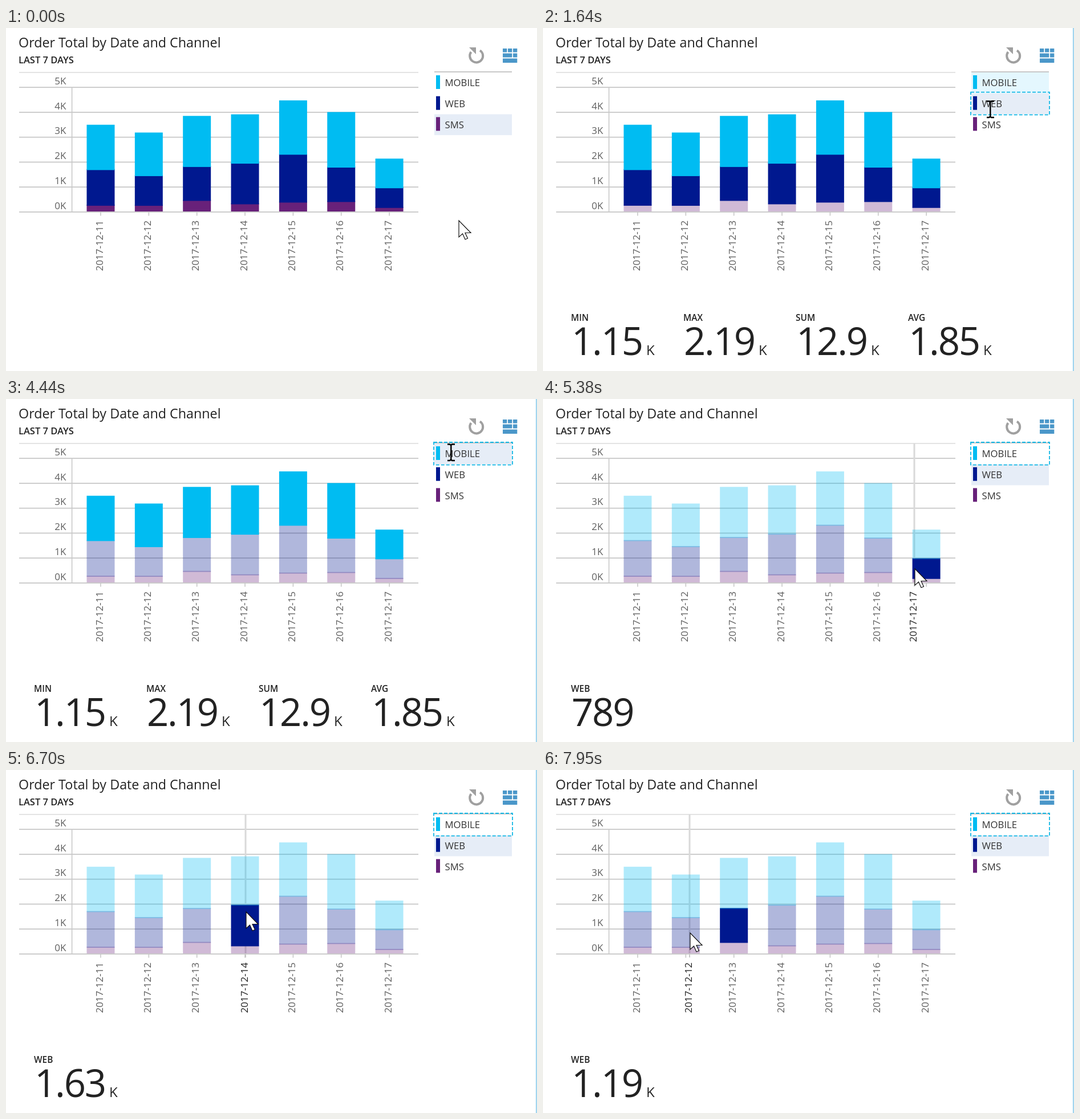
Write an HTML page that moves like this. It is 931 by 602 pixels and loops after 8 s.

```html
<!DOCTYPE html>
<html lang="en">
<head>
<meta charset="utf-8">
<title>Order Total by Date and Channel</title>
<style>
html, body { margin: 0; width: 100%; height: 100%; overflow: hidden; background: #fff; }
svg { display: block; width: 931px; height: 602px; font-family: "Open Sans", "Noto Sans", sans-serif; fill: #222; }
text { white-space: pre; }
.title { font-size: 23.3px; }
.sub { font-size: 16.5px; font-weight: 600; }
.axis { font-size: 17px; fill: #5e5e5e; }
.hot { fill: #222; }
.key { font-size: 16.7px; fill: #333; }
.name { font-size: 15.4px; font-weight: 600; }
.num { font-size: 67px; letter-spacing: -2.2px; }
.unit { font-size: 24px; letter-spacing: 0; }
</style>
</head>
<body>
<svg id="stage" viewBox="0 0 931 602"></svg>
<script>
const LOOP = 8000, LAG = 100;
const LEFT = 23, AXIS = 115.5, RIGHT = 723, TOP = 78, BASE = 322.5, UNIT = 43.75;
const KEY = 751, KEY_W = 136, ROW = 36.7, BAR = 49, GRID = '#c8c8c8', BLUE = '#4a97c9';

// values in thousands; on and off are the times of the legend clicks
const series = [
  { name: 'MOBILE', color: '#00bcf2', data: [1.78, 1.71, 2.01, 1.94, 2.14, 2.19, 1.15], on: 870, off: 4400 },
  { name: 'WEB', color: '#00188f', data: [1.43, 1.19, 1.36, 1.63, 1.92, 1.38, .789], on: 1630, off: 4130 },
  { name: 'SMS', color: '#68217a', data: [.265, .262, .459, .322, .391, .414, .177], on: 2490, off: 3740 }
];
// pointer stops: time, x, y
const stops = [
  [80, 794, 338], [560, 784, 97], [1250, 783, 97], [1560, 784, 143], [1730, 784, 143], [2190, 785, 170],
  [3590, 784, 163], [3670, 784, 163], [4360, 780, 94], [4590, 780, 94], [5060, 700, 260], [5380, 652, 298],
  [6700, 421, 249], [7200, 404, 253], [7850, 325, 281], [7950, 258, 286]
];

const rect = (x, y, w, h, fill, more = '') =>
  `<rect x="${x}" y="${y}" width="${w}" height="${h}" fill="${fill}" ${more}/>`;
const text = (x, y, s, cls, more = '') => `<text x="${x}" y="${y}" class="${cls}" ${more}>${s}</text>`;
const sum = list => list.reduce((a, b) => a + b, 0);
const center = i => 166 + 84.35 * i;
const inKey = (x, y) => x > KEY && y > TOP && y < TOP + 3 * ROW;
const chosen = t => series.map(d => t >= d.on && t < d.off);

// top edge of a segment, stacked from the last series upwards
const segTop = (s, i) => BASE - UNIT * sum(series.slice(s).map(d => d.data[i]));

function pointer(t) {
  const k = stops.findIndex(p => p[0] > t);
  if (k < 1) return (k ? stops[stops.length - 1] : stops[0]).slice(1);
  const a = stops[k - 1], b = stops[k], f = (t - a[0]) / (b[0] - a[0]), e = f * f * (3 - 2 * f);
  return [1, 2].map(j => a[j] + (b[j] - a[j]) * e);
}

// s: series under the pointer, i: date under the pointer (-1 for none)
function hover(t) {
  const [x, y] = pointer(t);
  if (inKey(x, y)) return { s: Math.floor((y - TOP) / ROW), i: -1 };
  if (x < AXIS || x > RIGHT || y < TOP || y > BASE) return { s: -1, i: -1 };
  const i = Math.max(0, Math.min(6, Math.round((x - center(0)) / 84.35)));
  const onBar = Math.abs(x - center(i)) < BAR / 2;
  return { s: onBar ? series.filter((d, s) => y > segTop(s, i)).length - 1 : -1, i };
}

function stats(t) {
  const { s, i } = hover(t), sel = series.filter((d, j) => chosen(t - LAG)[j]);
  if (i >= 0) return (s < 0 ? series : [series[s]]).map(d => [d.name, d.data[i]]);
  if (sel.length > 1) return sel.map(d => [d.name, sum(d.data)]);
  const one = sel[0] || series[s];
  if (!one) return [];
  const v = one.data, total = sum(v);
  return [['MIN', Math.min(...v)], ['MAX', Math.max(...v)], ['SUM', total], ['AVG', total / v.length]];
}

function drawStats(t) {
  let x = 50, out = '';
  for (const [name, v] of stats(t)) {
    const big = v >= 1, num = String(big ? +v.toPrecision(3) : Math.round(v * 1000));
    const unit = big ? '<tspan class="unit" dx="7">K</tspan>' : '';
    out += text(x - 1, 513.5, name, 'name') + text(x, 574, num + unit, 'num');
    x += 36 * num.replace('.', '').length + (big ? 89 : 53);
  }
  return out;
}

function drawBars(t) {
  const h = hover(t), sel = chosen(t), idle = h.s < 0 && !sel.includes(true);
  let out = '';
  for (let s = 2; s >= 0; s--) for (let i = 0; i < 7; i++) {
    const y = segTop(s, i) - .7, end = s < 2 ? segTop(s + 1, i) + 1 : BASE - .5;
    const lit = idle || (h.i >= 0 ? h.s === s && h.i === i : sel[s] || h.s === s);
    out += rect(center(i) - BAR / 2, y, BAR, end - y, series[s].color, `opacity="${lit ? 1 : .31}"`);
  }
  return out;
}

function drawLegend(t) {
  const sel = chosen(t), row = t < 80 ? 2 : hover(t).s;
  let out = rect(KEY, 76, KEY_W, 2, GRID), last = 0, focus = '';
  series.forEach((d, s) => {
    const y = TOP + ROW * s, click = t >= d.off ? d.off : t >= d.on ? d.on : 0;
    const bg = row === s ? '#e6edf7' : sel[s] ? '#e4f7fe' : 'none';
    out += rect(KEY, y, KEY_W, ROW, bg) + rect(KEY + 3, y + 5, 7, 24, d.color) + text(769.5, y + 24.3, d.name, 'key');
    if (click > last) {
      last = click;
      focus = rect(KEY - 1, y - 2, KEY_W + 2, ROW + 3, 'none', 'stroke="#14b8e6" stroke-width="1.8" stroke-dasharray="6 3"');
    }
  });
  return out + focus;
}

function drawPlot(t) {
  const h = hover(t), cross = pointer(t)[0] - 1;
  let out = rect(LEFT, 77.5, RIGHT - LEFT, 1, GRID);
  for (let k = 0; k < 6; k++) {
    const y = BASE - k * UNIT;
    out += rect(LEFT, y - .5, RIGHT - LEFT, 1.8, GRID) + text(105.5, y - 5, k + 'K', 'axis', 'text-anchor="end"');
  }
  out += rect(AXIS - .7, 104, 1.6, 219, GRID);
  if (h.i >= 0) out += rect(cross - 1.5, TOP, 3, BASE - TOP, '#d9d9d9') + rect(cross - 1, 323, 2, 6, GRID);
  for (let i = 0; i < 7; i++) {
    const hot = h.i === i, x = hot ? cross + 4 : center(i) + 3.5;
    out += rect(center(i) - .8, 323, 1.6, 6.5, GRID) +
      `<g transform="translate(${x} 426.5) rotate(-90)">${text(0, 0, '2017-12-' + (11 + i), hot ? 'axis hot' : 'axis')}</g>`;
  }
  return out;
}

function drawPointer(t) {
  const [x, y] = pointer(t);
  const shape = inKey(x, y)
    ? '<path d="M-6-14.5H-2L0-13L2-14.5H7M-6 14H-2L0 12.5L2 14H7M.3-13V13" fill="none" stroke="#000" stroke-width="2.4"/>'
    : '<path d="M0 0V29L6.5 23L11 33L15.5 31.2L11 21.5H21Z" fill="#fff" stroke="#111" stroke-width="1.2"/>';
  return `<g transform="translate(${x} ${y})">${shape}</g>`;
}

const header = text(22, 34, 'Order Total by Date and Channel', 'title') + text(22, 62, 'LAST 7 DAYS', 'sub') +
  '<path d="M831 39.3A11.5 11.5 0 1 1 815.5 42" fill="none" stroke="#a0a0a0" stroke-width="4"/>' +
  '<path d="M812 34H824V46Z" fill="#a0a0a0"/>' +
  [0, 9, 18].map(x => rect(871 + x, 36, 7.3, 6.5, BLUE)).join('') +
  rect(871, 44.5, 16.3, 7, BLUE) + rect(889, 44.5, 7.3, 7, BLUE) + rect(871, 53.5, 25.3, 7.5, BLUE);

const stage = document.getElementById('stage'), start = performance.now();

function frame(now) {
  const t = Math.max(0, now - start) % LOOP;
  stage.innerHTML = header + drawPlot(t) + drawBars(Math.max(0, t - LAG)) + drawLegend(t) + drawStats(t) +
    (t >= series[0].on ? rect(929, 0, 1.6, 602, '#86c9ea') : '') + drawPointer(t);
  requestAnimationFrame(frame);
}
frame(start);
</script>
</body>
</html>
```
